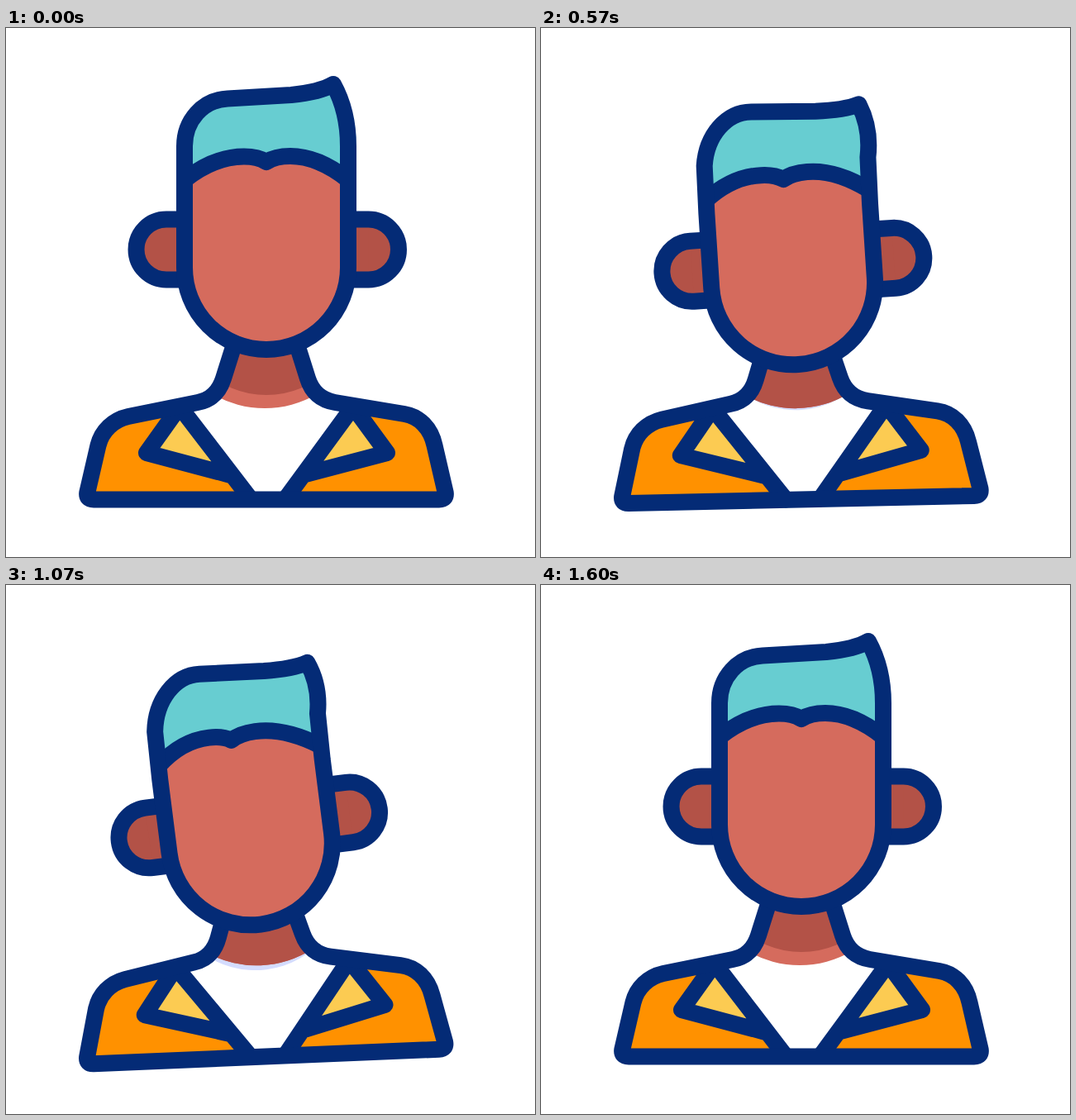
Animation of 640 by 640 pixels, one loop 2000 ms. Source, as an HTML page:

```html
<!DOCTYPE html>
<html lang="en">
<head>
<meta charset="utf-8">
<title>Head shake</title>
<style>
  html, body { margin: 0; width: 100%; height: 100%; overflow: hidden; background: #fff; }
  svg { display: block; width: 100vw; height: 100vh; }
  .line { fill: none; stroke: #042b76; stroke-width: 20; stroke-linecap: round; stroke-linejoin: round; }
  .dark { fill: #b35247; }
  .skin { fill: #d56b5d; }
</style>
</head>
<body>
<svg viewBox="0 0 640 640">
  <defs>
    <path id="coat" d="M275 386L263 424C258 440 248 450 232 453L148 470C130 474 116 487 111.5 505L98.3 562Q97 570.5 106 570.5H524Q533 570.5 531.7 562L518.5 505C514 484 500 470 482 467L398 453C381 450 370 440 365 424L353 386"/>
    <path id="shirt" d="M275 380L263 424C258 440 248 450 232 453L210 458L296 570H338L420 458L398 453C381 450 370 440 365 424L353 380Z"/>
    <path id="neck" d="M275 380L263 424Q259 436 250 443A125 125 0 0 0 376 443Q369 436 365 424L353 380Z"/>
    <clipPath id="inShirt"><use href="#shirt"/></clipPath>
    <clipPath id="inNeck"><use href="#neck"/></clipPath>
  </defs>
  <g id="torso">
    <use href="#coat" fill="#ff9100"/>
    <use href="#shirt" fill="#fff"/>
    <g clip-path="url(#inShirt)"><circle class="tilt" cx="315" cy="335" r="109" fill="#d4dcff"/></g>
    <use href="#neck" class="skin"/>
    <g clip-path="url(#inNeck)"><circle class="tilt dark" cx="315" cy="335" r="109"/></g>
    <path fill="#fccb52" d="M210 458L170 514L270 540.5ZM420 458L461 514L364 539.5Z"/>
    <path class="line" d="M270 540.5L170 514L210 458L296 570M364 539.5L461 514L420 458L338 570"/>
    <use href="#coat" class="line"/>
    <g class="tilt">
      <g id="ears">
        <circle class="dark" cx="194" cy="268" r="36.5"/>
        <circle class="dark" cx="438.5" cy="268" r="36.5"/>
        <path class="dark" d="M194 231.5H438.5V304.5H194Z"/>
        <path class="line" d="M216 231.5H194A36.5 36.5 0 0 0 194 304.5H216M414 231.5H438.5A36.5 36.5 0 0 1 438.5 304.5H414"/>
      </g>
      <path id="hair" fill="#67cdd1"/>
      <path id="face" class="skin"/>
      <path id="fringe" class="line"/>
      <path id="edge" class="line"/>
    </g>
  </g>
</svg>
<script>
const $ = id => document.getElementById(id);
const tilted = document.querySelectorAll('.tilt');

const CROWN = 'M216,200 L216,143 C216,112 238,87 268,85.5 L345,81 C365,79 384,75 396,68 C407,88 414,114 414,143 L414,200';
const FRINGE = 'M217,183 C240,165 264,155.5 288,155.5 C299,155.5 308,157.5 315,162 C322,157.5 333,155 344,155 C368,155 390,165 413,183';
const CHIN = ' L414,290 A99 99 0 0 1 216 290 Z';

const MID = 315, FPS = 30, LOOP = 2000, BEAT = 12;
const swings = [0, -1, 1, -1, 0]; // head turn at the end of each beat

const smooth = p => p * p * (3 - 2 * p);
const mix = (a, b, s) => a + (b - a) * s;

// Moves every "x,y" pair of a path
const warp = (path, move) => path.replace(/([\d.]+),([\d.]+)/g,
  (_, x, y) => move(+x, +y).map(v => v.toFixed(2)).join(' '));

function pose(ms) {
  const frame = Math.floor((Math.floor(ms / 10) * 10 + 4) * FPS / 1000);
  const beat = Math.floor(frame / BEAT);
  if (beat >= swings.length - 1) return { turn: 0, left: 0, right: 0 };
  const s = smooth(frame % BEAT / BEAT);
  const between = f => mix(f(swings[beat]), f(swings[beat + 1]), s);
  return {
    turn: between(v => v),
    left: between(v => Math.max(0, -v)),
    right: between(v => Math.max(0, v))
  };
}

function draw(ms) {
  const { turn, left, right } = pose(ms);
  $('torso').setAttribute('transform', `rotate(${5 * turn} ${MID} 571)`);
  const move = `translate(0 ${29 * left}) rotate(${10 * turn} ${MID} 389)`;
  tilted.forEach(el => el.setAttribute('transform', move));

  // The quiff leans back as the head drops to the left
  const crown = warp(CROWN, (x, y) => {
    const rise = Math.max(0, 150 - y) * left;
    return [x + 0.24 * rise, y + 0.0028 * (x - MID) * rise];
  });
  // The hairline slides sideways, fixed at both temples
  const fringe = warp(FRINGE, (x, y) => {
    const loose = 1 - ((x - MID) / 99) ** 2;
    return [x + 15 * turn * loose, y + 6 * right * loose];
  });

  $('hair').setAttribute('d', crown);
  $('edge').setAttribute('d', crown + CHIN);
  $('face').setAttribute('d', fringe + CHIN);
  $('fringe').setAttribute('d', fringe);
}

const start = performance.now();
function tick(now) {
  draw(Math.max(0, now - start) % LOOP);
  requestAnimationFrame(tick);
}
draw(0);
requestAnimationFrame(tick);
</script>
</body>
</html>
```
